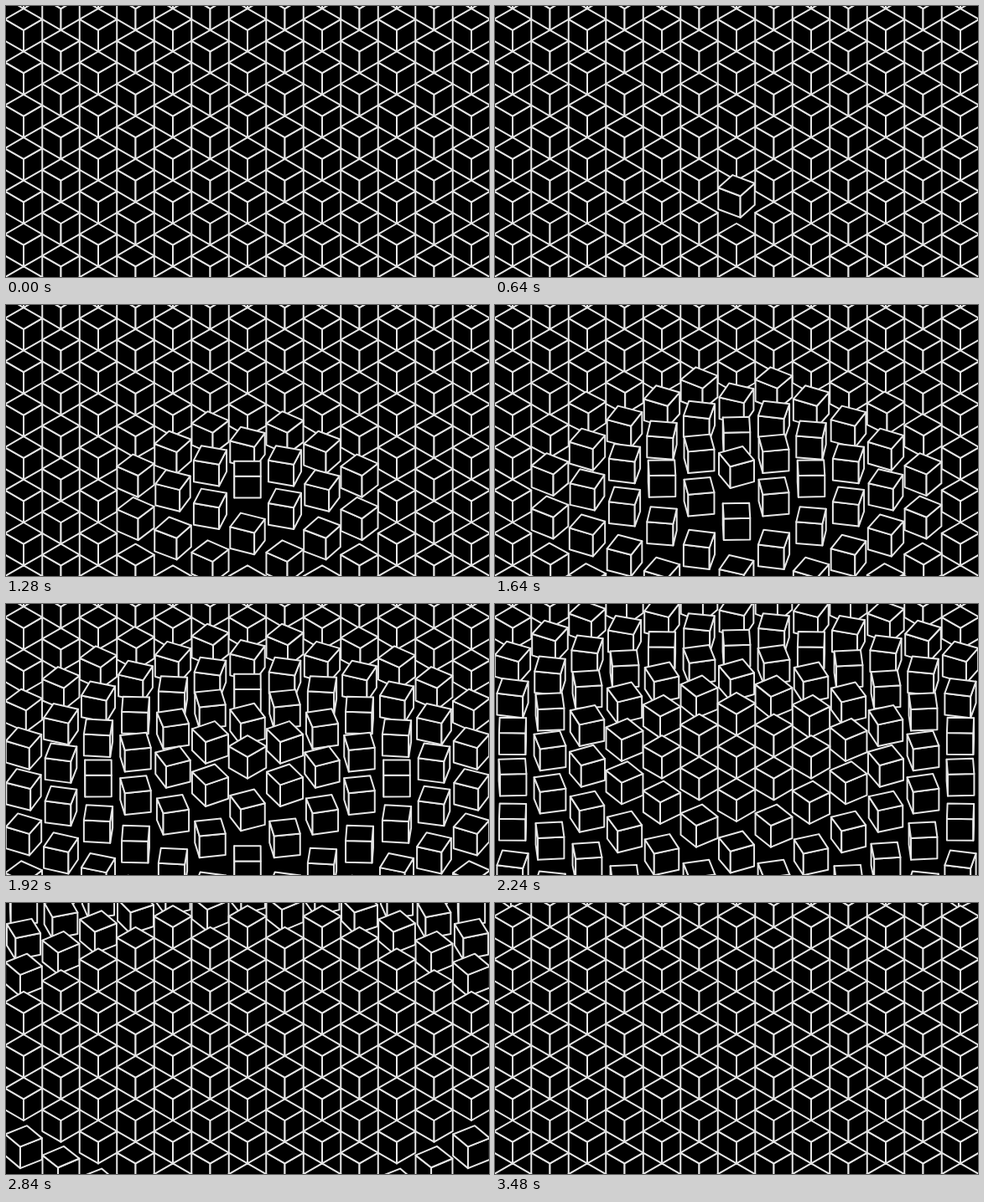
Animation of 576x324 px, one loop 4.84 s. Source, as an HTML page with a canvas:

```html
<!DOCTYPE html>
<html lang="en">
<head>
<meta charset="utf-8">
<title>Turning cubes</title>
<style>
html, body { margin: 0; width: 100%; height: 100%; overflow: hidden; background: #000; }
canvas { display: block; }
</style>
</head>
<body>
<canvas id="stage" width="576" height="324"></canvas>
<script>
const ctx = document.getElementById('stage').getContext('2d');

const LOOP = 4840, STEP = 40;
const CX = 288, CY = 234.3;
const COL = 44.5;                    // column spacing
const EDGE = COL / Math.sqrt(3);     // projected upright edge
const ROW = EDGE * 2;                // row spacing, also the distance each cube climbs
const R = COL / 2, DEPTH = EDGE / 2; // half axes of the turning corners
const SPREAD = 340;                  // ground distance the wave covers while one cube turns
const REACH = 838, TRAVEL = 4300;    // how far the wave runs, and for how long

const cubes = [];
for (let row = -6; row <= 5; row++) {
  for (let col = -7; col <= 7; col++) {
    const dx = col * COL;
    const dy = (row + Math.abs(col % 2) / 2) * ROW;
    cubes.push({ x: CX + dx, y: CY + dy, dist: Math.hypot(dx, dy * Math.sqrt(3)) });
  }
}

function face(points) {
  ctx.beginPath();
  points.forEach(([x, y]) => ctx.lineTo(x, y));
  ctx.closePath();
  ctx.fill();
  ctx.stroke();
}

function drawCube(x, y, turn) {
  if (turn > Math.PI / 4) turn -= Math.PI / 2;
  const top = [0, 1, 2, 3].map(k => {
    const a = turn + k * Math.PI / 2;
    return [x + R * Math.sin(a), y - EDGE / 2 + DEPTH * Math.cos(a)];
  });
  const low = ([px, py]) => [px, py + EDGE];
  const [front, right, , left] = top;
  face([left, front, low(front), low(left)]);
  face([front, right, low(right), low(front)]);
  face(top);
}

function draw(t) {
  const wave = REACH * (1 - Math.cos(Math.PI * Math.min(1, t / TRAVEL))) / 2;
  ctx.fillStyle = '#000';
  ctx.fillRect(0, 0, 576, 324);
  ctx.strokeStyle = '#e6e6e6';
  ctx.lineWidth = 2;
  ctx.lineJoin = 'round';
  cubes
    .map(c => {
      const p = Math.min(1, Math.max(0, (wave - c.dist) / SPREAD));
      return { x: c.x, y: c.y - p * ROW, turn: p * Math.PI / 2 };
    })
    .sort((a, b) => a.y - b.y)
    .forEach(c => drawCube(c.x, c.y, c.turn));
}

const start = performance.now();
function tick() {
  const t = (performance.now() - start) % LOOP;
  draw(Math.floor(t / STEP) * STEP);
  requestAnimationFrame(tick);
}
tick();
</script>
</body>
</html>
```
